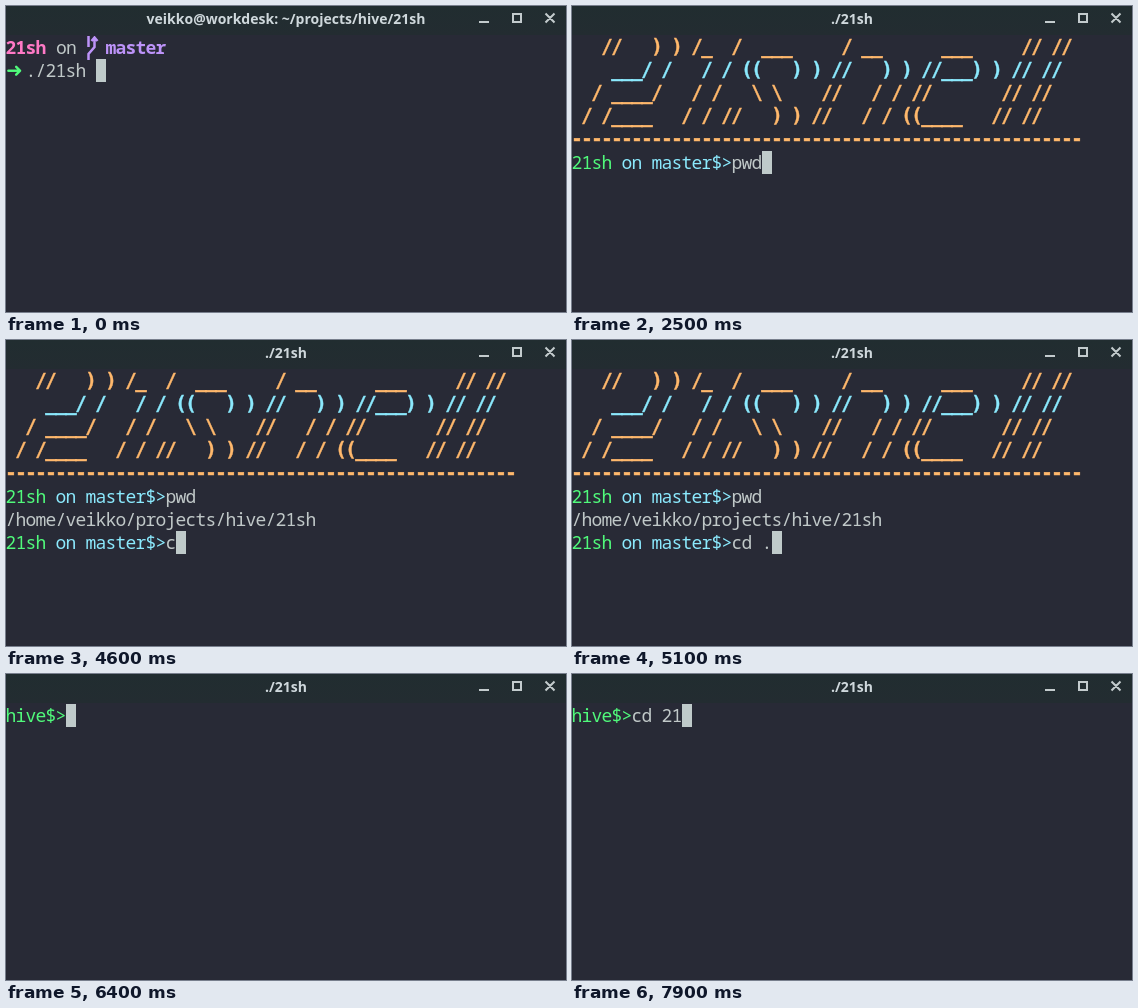
Animation, 560 px wide and 306 px high, one loop 8 s. Source, as an HTML page:

```html
<!DOCTYPE html>
<html lang="en">
<head>
<meta charset="utf-8">
<title>Terminal session</title>
<style>
  html, body { margin: 0; width: 100%; height: 100%; overflow: hidden; background: #282a36; }
  #stage { position: relative; width: 560px; height: 306px; overflow: hidden; }
  #bar { position: absolute; inset: 0 0 auto; height: 29px; background: linear-gradient(#212d30, #232c31); }
  #title {
    position: absolute; inset: 0; text-align: center; white-space: pre;
    font: bold 14px/26px "Noto Sans", sans-serif; color: #cfd8dc;
  }
  #icons, .branch { position: absolute; fill: none; stroke-width: 2; }
  #icons { left: 0; top: 0; stroke: #c3cbcd; }
  #screen {
    position: absolute; left: 0; top: 30px; color: #c0c8c8; white-space: pre;
    font: 18px/23px "Noto Sans Mono", monospace; letter-spacing: calc(10px - .6em);
  }
  #screen div { height: 23px; }
  .text { position: relative; left: -.4px; }
  .banner {
    position: relative; left: -.7px; top: -1px; -webkit-text-stroke: .4px;
    font: bold 19px/23px "DejaVu Sans Mono", monospace; letter-spacing: calc(10px - .602em);
  }
  .orange { color: #ffb86c; }
  .cyan { color: #8be9fd; }
  .green { color: #50fa7b; }
  .pink { color: #ff79c6; }
  .purple { color: #bd93f9; }
  b { font-weight: bold; }
  .cursor { display: inline-block; vertical-align: top; width: 10px; height: 23px; background: #bfcaca; }
  .arrow { display: inline-block; width: 20px; height: 23px; vertical-align: top; font: 20px/23px "DejaVu Sans", sans-serif; letter-spacing: 0; }
  .branch { left: 80px; top: 0; stroke: #bd93f9; stroke-width: 2.5; }
</style>
</head>
<body>
<div id="stage">
  <div id="bar">
    <div id="title"></div>
    <svg id="icons" width="560" height="28">
      <path d="M473 16H483M507 8H515V16H507ZM539.5 7.5L548.5 16.5M548.5 7.5L539.5 16.5"/>
    </svg>
  </div>
  <div id="screen"></div>
</div>
<script>
const LOOP = 8000;
const title = document.getElementById('title');
const screen = document.getElementById('screen');

const span = (cls, text) => `<span class="${cls}">${text}</span>`;
const CURSOR = span('cursor', '');
const BRANCH = '<svg class="branch" width="14" height="24">' +
  '<path d="M2.5 0V11M2.5 24V18L8.5 11V2M5.5 5L8.5 1.5L11.5 5"/></svg>';

const art = [
  '   //   ) ) /_  /  ___     / __      ___     // //',
  '    ___/ /   / / ((   ) ) //   ) ) //___) ) // //',
  '  / ____/   / /   \\ \\    //   / / //       // //',
  ' / /____   / / //   ) ) //   / / ((____   // //',
  '-'.repeat(51)
];
const banner = art.map((row, i) => span('banner ' + (i === 1 ? 'cyan' : 'orange'), row));
const repo = span('text green', '21sh') + span('text cyan', ' on master$>');
const hive = span('text green', 'hive$>');

// Each command lists the moment every character appears.
const pwd = ['pwd', [2100, 2300, 2500]];
const up = ['cd ..', [4600, 4700, 5000, 5100, 5300]];
const back = ['cd 21', [7200, 7300, 7600, 7900, 7900]];
const typed = ([text, times], t) =>
  span('text', text.slice(0, times.filter(at => at <= t).length));

function lines(t) {
  if (t < 1100) return [
    `<b class="text pink">21sh</b> on ${BRANCH}  <b class="text purple">master</b>`,
    span('green arrow', '➜') + span('text', './21sh ')
  ];
  if (t >= 6400) return [hive + typed(back, t)];
  const out = [...banner, repo + typed(pwd, t)];
  if (t >= 3000) out.push(span('text', '/home/veikko/projects/hive/21sh'), repo + typed(up, t));
  if (t >= 5700) out.push(hive);
  return out;
}

let shown = '';
function draw() {
  const t = performance.now() % LOOP;
  const html = lines(t).join('</div><div>');
  if (html !== shown) {
    shown = html;
    screen.innerHTML = `<div>${html}${CURSOR}</div>`;
    title.textContent = t < 1100 ? 'veikko@workdesk: ~/projects/hive/21sh' : './21sh';
  }
  requestAnimationFrame(draw);
}
draw();
</script>
</body>
</html>
```
